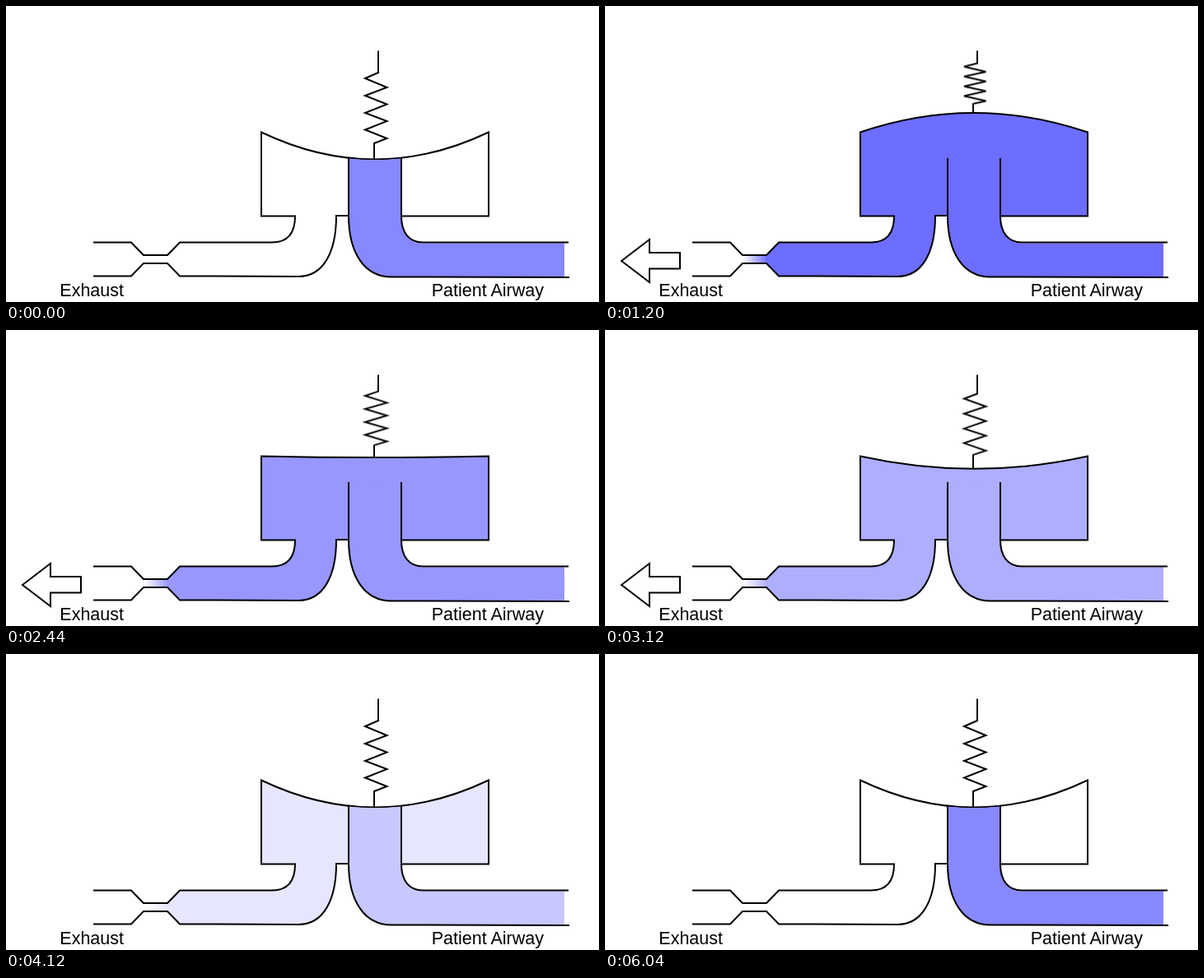
Recreate the animation shown at these times as an HTML page. Size 720 by 360 pixels, loop 6.08 s.

```html
<!DOCTYPE html>
<html lang="en">
<head>
<meta charset="utf-8">
<title>Exhaust valve cycle</title>
<style>
  html, body { margin: 0; width: 100%; height: 100%; overflow: hidden; background: #fff; }
  svg { display: block; width: 720px; height: 360px; }
  text { font: 21.5px "Liberation Sans", Arial, sans-serif; }
  .line { fill: none; stroke: #000; stroke-width: 2; }

  .airway, .chamber, .dome, .spring { animation: 6080ms linear infinite; }
  .airway { fill: currentColor; animation-name: pressure; }
  .chamber { fill: currentColor; animation-name: flood; }
  .dome { stroke: #000; stroke-width: 2; animation-name: bulge; }
  .spring { transform-origin: 0 54.5px; vector-effect: non-scaling-stroke; animation-name: squeeze; }
  .arrow { fill: #fff; animation: vent 6080ms step-end infinite; }

  /* 600 ms opening, 1000 ms peak, 4000 ms closed, 4240 ms chamber empty */
  @keyframes pressure {
    0%, 100% { color: #8787ff; }
    16.447% { color: #66f; }
    65.789% { color: #ccf; }
  }
  @keyframes flood {
    0%, 9.868%, 69.737%, 100% { color: #fff; }
    16.447% { color: #66f; }
    65.789% { color: #ccf; }
  }
  @keyframes bulge {
    0%, 9.868%, 65.789%, 100% { d: path("M310 195V153.5Q448 219.5 586 153.5V195"); }
    16.447% { d: path("M310 195V153.5Q448 98.5 586 153.5V195"); }
  }
  @keyframes squeeze {
    0%, 9.868%, 65.789%, 100% { transform: scaleY(1); }
    16.447% { transform: scaleY(.5417); }
  }
  @keyframes vent {
    0%, 65.789%, 100% { visibility: hidden; }
    16.447% { visibility: visible; }
  }
</style>
</head>
<body>
<svg viewBox="0 0 720 360">
  <g class="chamber">
    <linearGradient id="fade" gradientUnits="userSpaceOnUse" x1="168" x2="197" y1="0" y2="0">
      <stop offset="0" stop-color="currentColor" stop-opacity="0"/>
      <stop offset="1" stop-color="currentColor"/>
    </linearGradient>
    <rect x="167" y="303" width="29.5" height="10" fill="url(#fade)"/>
    <path d="M310 190H586V255.5H401C401 300 385 329 355 329L240 328.5H211L196 313V303L211 287.5H323C342 287.5 351 276 351 255.5H310Z"/>
    <path class="dome" d="M310 195V153.5Q448 219.5 586 153.5V195"/>
  </g>

  <path class="airway" d="M416 185.6Q448 189 480 185.6V255.5C480 275 489 288.5 506 288.5H678V329.5H468C435 329.5 416 300 416 255Z"/>

  <g class="line">
    <path d="M310 190V255.5H351C351 276 342 287.5 323 287.5H211L196 303H167L152 287.5H106"/>
    <path d="M106 328.5H152L167 313H196L211 328.5H240L355 329C385 329 401 300 401 255H416"/>
    <path d="M416 185V255C416 300 435 329.5 468 329.5L684 330"/>
    <path d="M480 185V255.5C480 275 489 287.5 506 287.5H683"/>
    <path d="M480 255.5H586V190"/>
    <path class="spring" d="M452 54.5V81L436 88L462.5 99L436 109L462.5 119.5L436 130L462.5 140L436 150.5L462.5 161L447 167V186.5"/>
    <path class="arrow" d="M20 310L54 284V300H91V319.5H54V336Z"/>
  </g>

  <text x="65.3" y="353">Exhaust</text>
  <text x="516.7" y="353">Patient Airway</text>
</svg>
</body>
</html>
```
